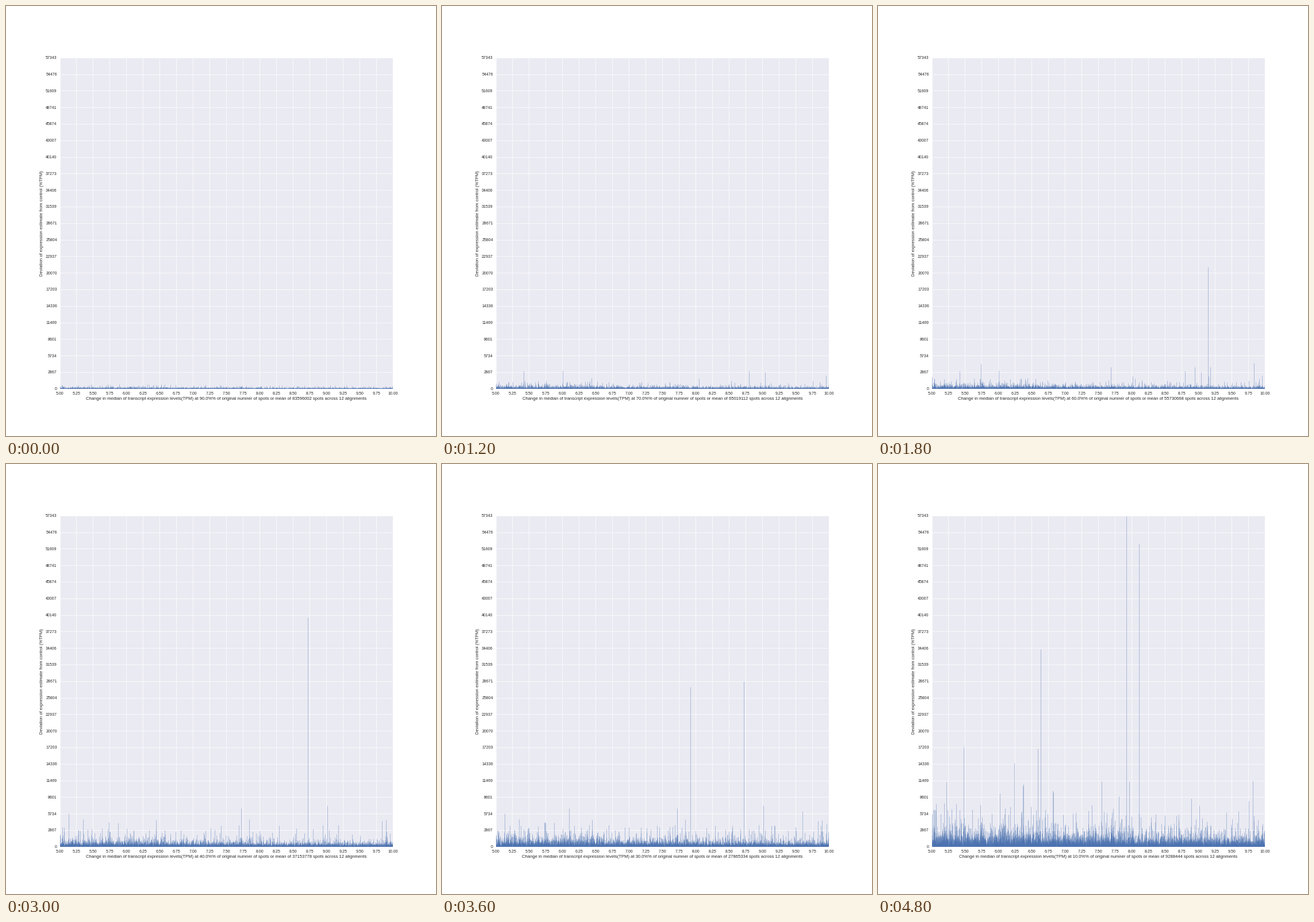
These frames come from a looping animation (748x748 px, 5400 ms). A matplotlib script:

```python
import numpy as np
import matplotlib.pyplot as plt
from matplotlib.animation import FuncAnimation
from matplotlib.collections import LineCollection

SIZE, DPI = 748, 50
STEPS = 9
TOP = 57342.8
TOTAL_SPOTS = 92884447
LEFT, WIDTH, HEIGHT = 0.125 * SIZE, 0.775 * SIZE, 0.77 * SIZE
INK, PANEL, BLUE = "#262626", "#EAEAF2", "#4C72B0"

plt.rcParams.update({
    "font.family": "Liberation Sans",
    "text.color": INK,
    "axes.labelcolor": INK,
    "xtick.color": INK,
    "ytick.color": INK,
})

# Outstanding peaks, column: (first step, heights in pixels)
PEAKS = {
    149: (7, 170, 174),
    278: (7, 169, 171),
    283: (8, 344),
    432: (6, 278, 356, 575),
    454: (8, 527),
    525: (5, 399, 288, 145),
    574: (3, 212, 172),
}

rng = np.random.default_rng(12)

# Dense noise floor: each column of the plot holds about a dozen bars
COUNT = 7000
columns = rng.integers(94, 673, COUNT)
slope = 1.2 - 0.5 * (columns - LEFT) / WIDTH
own = rng.standard_normal(COUNT)
jitter = rng.standard_normal((STEPS, COUNT))

# Occasional spikes: they appear at some step, taller the later, and stay
SPIKES = 110
spike_columns = rng.integers(94, 673, SPIKES)
births = (STEPS * np.sqrt(rng.random(SPIKES))).astype(int)
spike_heights = 25 * 1.25 ** births * (0.35 + 0.65 * rng.random(SPIKES) ** 3)


def floor_heights(step):
    z = np.minimum(0.85 * own + 0.53 * jitter[step], 3)
    return np.maximum(1.2 * 1.32 ** step * slope * np.exp(0.72 * (z - 0.55)), 1)


def peak_heights(step):
    for first, *heights in PEAKS.values():
        age = step - first
        yield heights[age] if 0 <= age < len(heights) else 0


def bars(step):
    x = np.concatenate([columns, spike_columns, list(PEAKS)])
    h = np.concatenate([
        floor_heights(step),
        np.where(births <= step, spike_heights, 0),
        list(peak_heights(step)),
    ])
    x = 5 + 5 * (x + 0.2 - LEFT) / WIDTH
    y = h * TOP / HEIGHT
    low = np.full_like(y, -2 * TOP / HEIGHT)
    return np.stack([np.column_stack([x, low]), np.column_stack([x, y])], axis=1)


def caption(step):
    tenths = STEPS - step
    return (f"Change in median of transcript expression levels(TPM) at {tenths * 10:.1f}%% "
            f"of original numner of spots or mean of {TOTAL_SPOTS * tenths // 10} "
            "spots across 12 alignments")


fig = plt.figure(figsize=(SIZE / DPI, SIZE / DPI), dpi=DPI, facecolor="white")
ax = fig.add_axes([0.125, 0.11, 0.775, 0.77], facecolor=PANEL)
ax.set_xlim(5, 10)
ax.set_ylim(0, TOP)
ax.set_axisbelow(True)
ax.grid(color="white", linewidth=1, linestyle="-")
for spine in ax.spines.values():
    spine.set_visible(False)

xticks = np.linspace(5, 10, 21)
yticks = np.linspace(0, TOP, 21)
ax.set_xticks(xticks, [f"{v:.2f}" for v in xticks])
ax.set_yticks(yticks, [f"{v:.0f}" for v in yticks])
ax.tick_params(length=0, pad=7, labelsize=10)
ax.set_ylabel("Deviation of expression estimate from control (%TPM)", fontsize=11, labelpad=4)
ax.set_xlabel(caption(0), fontsize=11, labelpad=4)

lines = LineCollection([], colors=BLUE, linewidths=72 / DPI, alpha=0.4, capstyle="butt")
lines.set_snap(True)
ax.add_collection(lines, autolim=False)


def draw(step):
    lines.set_segments(bars(step))
    ax.xaxis.label.set_text(caption(step))
    return lines, ax.xaxis.label


anim = FuncAnimation(fig, draw, frames=STEPS, interval=600, repeat=True, repeat_delay=0)
plt.show()
```
